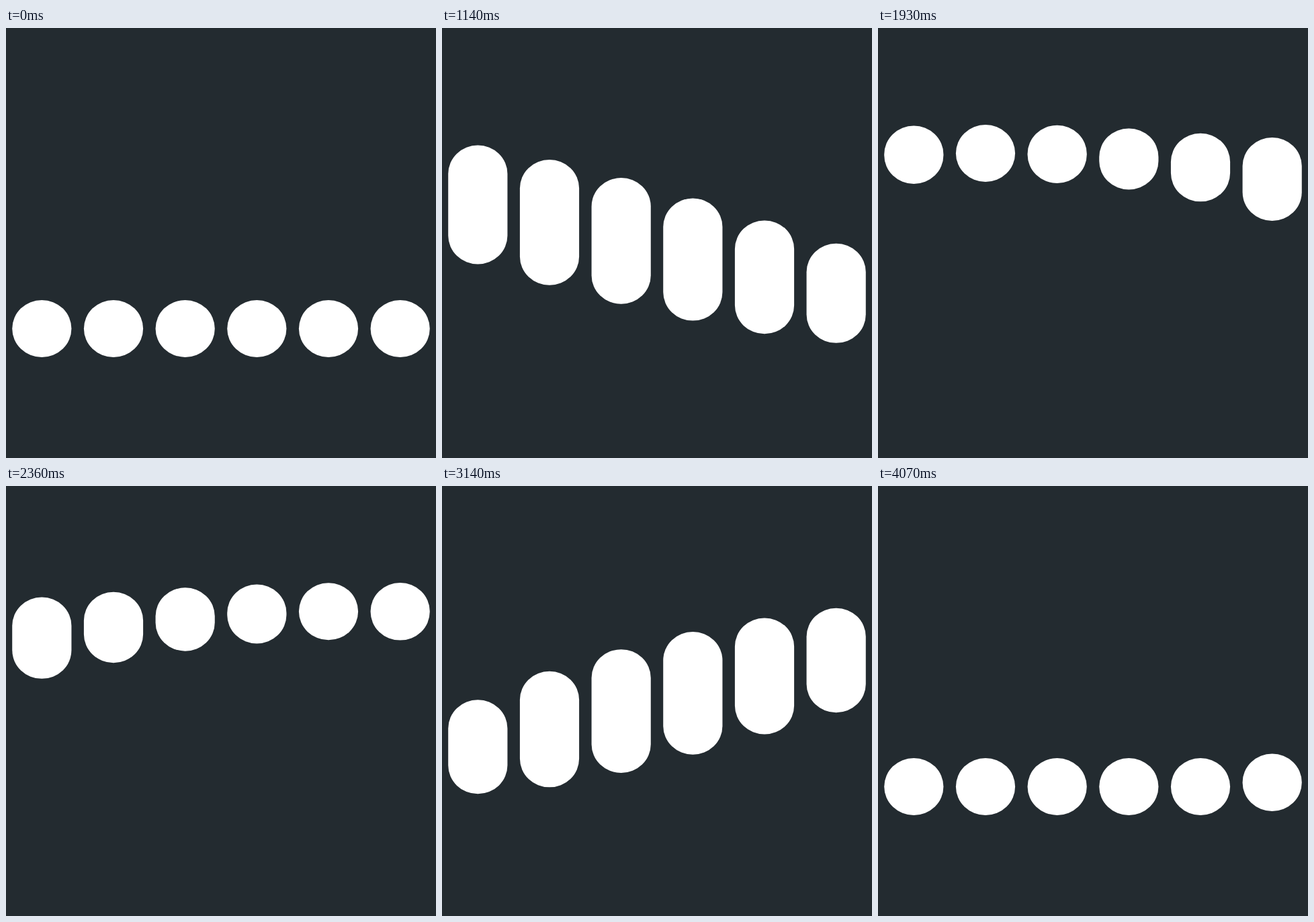
These frames come from a looping animation (640 by 640 pixels, 4.14 s). An HTML page:

```html
<!DOCTYPE html>
<html lang="en">
<head>
<meta charset="utf-8">
<title>Pill wave</title>
<style>
  html, body { margin: 0; height: 100%; overflow: hidden; background: #232b30; }
  svg { display: block; width: 100%; height: 100%; }
  rect { fill: #fff; }
</style>
</head>
<body>
<svg viewBox="0 0 640 640"></svg>
<script>
const LOOP = 4140, STEPS = 58;   // the picture advances in 58 steps per loop
const COUNT = 6, STAGGER = 3;    // each pill trails its neighbour by 3 ticks
const PITCH = 640 / COUNT, HALF_WIDTH = 44.1, CAP = 42.5;
const LOW = 447.4, HIGH = 186.5; // centre heights of the two resting places
const ROUND = 85, UP_STRETCH = 103, DOWN_STRETCH = 99.5;

// Progress of a cubic-bezier(x1, 0, x2, 1) move between two ticks
function ease(tick, from, to, x1, x2) {
  const x = (tick - from) / (to - from);
  if (x <= 0) return 0;
  if (x >= 1) return 1;
  let lo = 0, hi = 1;
  for (let i = 0; i < 24; i++) {
    const s = (lo + hi) / 2, r = 1 - s;
    if (3 * r * s * (r * x1 + s * x2) + s ** 3 < x) lo = s; else hi = s;
  }
  return lo * lo * (3 - 2 * lo);
}

// The pill rises, rests and falls
const center = tick => LOW + (HIGH - LOW)
  * (ease(tick, 0, 44, 0.36, 0.64) - ease(tick, 45, 89, 0.42, 0.76));

// It stretches and relaxes once on the way up and once on the way down
const length = tick => ROUND
  + UP_STRETCH * (ease(tick, 0, 23, 0.45, 0.555) - ease(tick, 23, 45, 0.5, 0.247))
  + DOWN_STRETCH * (ease(tick, 45, 71, 0.553, 0.655) - ease(tick, 71, 87, 0.489, 0.411));

const svg = document.querySelector("svg");
const pills = Array.from({ length: COUNT }, (_, i) => {
  const pill = document.createElementNS(svg.namespaceURI, "rect");
  pill.setAttribute("x", PITCH * (i + 0.5) - HALF_WIDTH);
  pill.setAttribute("width", HALF_WIDTH * 2);
  pill.setAttribute("rx", HALF_WIDTH);
  pill.setAttribute("ry", CAP);
  return svg.appendChild(pill);
});

function draw(ms) {
  const step = Math.floor((ms % LOOP + 5) / (LOOP / STEPS)) % STEPS;
  const tick = Math.ceil(step * 25 / 14) - 1;
  pills.forEach((pill, i) => {
    const local = tick - i * STAGGER, height = length(local);
    pill.setAttribute("y", center(local) - height / 2);
    pill.setAttribute("height", height);
  });
}

let start;
function frame(now) {
  start ??= now;
  draw(now - start);
  requestAnimationFrame(frame);
}
draw(0);
requestAnimationFrame(frame);
</script>
</body>
</html>
```
